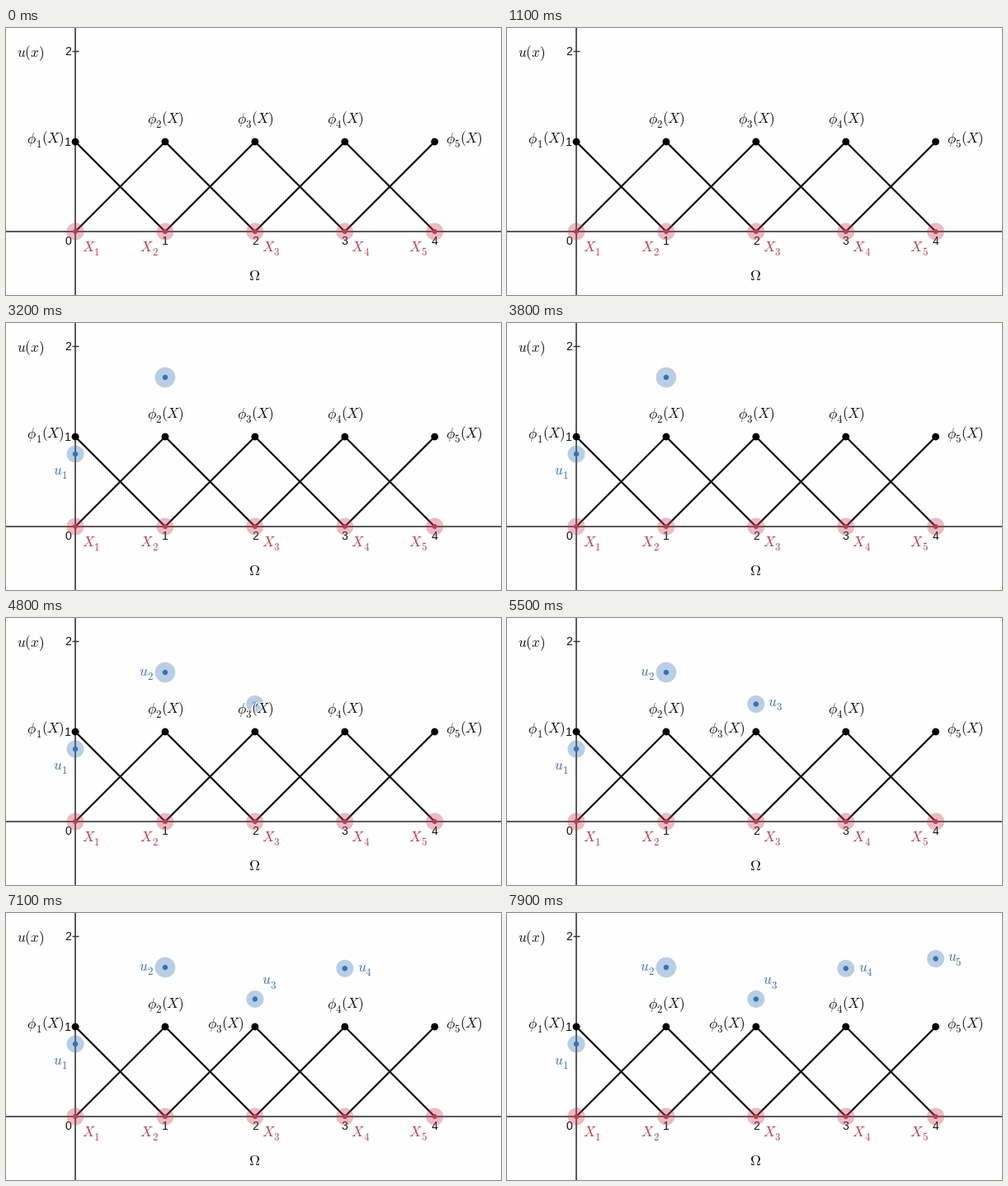
A matplotlib script that plays this animation: 600 by 324 pixels, repeating every 8 s.

```python
import matplotlib.pyplot as plt
from matplotlib.animation import FuncAnimation
from matplotlib.patches import Circle
from matplotlib.patheffects import Stroke

W, H, DPI = 600, 324, 100
STEP, FRAMES = 100, 80
PX = 72 / DPI
EM = 17.2
FOREVER = STEP * FRAMES

BLACK, AXIS = "#111111", "#333333"
RED, BLUE = "#c43a4f", "#3274b5"
X0, UNIT, BASE, PEAK = 84, 108.9, 247, 138

plt.rcParams["mathtext.fontset"] = "cm"
fig = plt.figure(figsize=(W / DPI, H / DPI), dpi=DPI, facecolor="#fefefe")
ax = fig.add_axes([0, 0, 1, 1])
ax.set(xlim=(0, W), ylim=(H, 0))
ax.axis("off")

timed = []  # (artists, start ms, end ms)


def node_x(i):
    return X0 + UNIT * i


def line(xs, ys, color, width, z):
    ax.plot(xs, ys, color=color, lw=width * PX, zorder=z, solid_capstyle="butt")


def glow(x, y, color, radius, core=3):
    halo = Circle((x, y), radius, fc=color, ec="none", alpha=0.34, zorder=4)
    dot = Circle((x, y), core, fc=color, ec="none", zorder=4.1)
    return [ax.add_patch(halo), ax.add_patch(dot)]


def math(x, y, tex, color=BLACK, size=EM):
    """Math text on a baseline, with a white outline beneath."""
    style = dict(fontsize=size * PX, va="baseline", ha="left")
    rim = ax.text(x, y, f"${tex}$", color="white", zorder=5, **style,
                  path_effects=[Stroke(linewidth=3 * PX, foreground="white")])
    ink = ax.text(x, y, f"${tex}$", color=color, zorder=6, **style)
    return [rim, ink]


def label(x, y, base, sub, color=BLACK, tail=""):
    advance = {r"\phi": 0.60, "u": 0.572, "X": 0.83}[base] * EM
    parts = math(x, y, base, color)
    parts += math(x + advance, y + 5.5, str(sub), color, 0.74 * EM)
    if tail:
        parts += math(x + advance + 0.41 * EM, y, tail, color)
    return parts


def phi(x, y, i):
    return label(x, y, r"\phi", i, tail="(X)")


def show(artists, start, end=FOREVER):
    timed.append((artists, start, end))


def number(x, y, n):
    ax.text(x, y, str(n), fontsize=14 * PX, family="Liberation Sans",
            color=BLACK, ha="center", va="baseline", zorder=2)


# axes and ticks
line([0, W], [BASE, BASE], AXIS, 1.6, 1)
line([83.8, 83.8], [0, H], AXIS, 1.6, 1)
number(75, 263, 0)
for n in range(1, 5):
    number(node_x(n), 263, n)
for n in (1, 2):
    y = BASE - 109.3 * n
    number(75, y + 5, n)
    line([80, 88], [y, y], AXIS, 1.4, 1)

# hat functions and nodes
for i in range(5):
    x = node_x(i)
    for j in (i - 1, i + 1):
        if 0 <= j < 5:
            line([x, node_x(j)], [PEAK, BASE], BLACK, 2.2, 3)
    ax.add_patch(Circle((x, PEAK), 4.4, fc="black", ec="none", zorder=3.5))
    glow(x, BASE, RED, 10.5)

for i, x in enumerate((92, 162.5, 310, 418.5, 488.5), 1):
    label(x, 271, "X", i, RED)

math(13, 35, "u(x)")
math(293.8, 306, r"\Omega", size=18)
phi(25.2, 139.5, 1)
phi(171, 115.5, 2)
phi(389, 115.5, 4)
phi(533, 139.5, 5)
show(phi(280, 115.5, 3), 0, 5000)
show(phi(244, 139.5, 3), 5000)

# nodal values
for i, (y, radius, start) in enumerate(
        [(159, 10.5, 1900), (66, 12.3, 3200), (104.5, 10.5, 4500),
         (67.3, 10.5, 5700), (55.5, 10.5, 7200)]):
    show(glow(node_x(i), y, BLUE, radius, 3.2), start)

for i, x, y, start, end in [
        (1, 57.3, 183.5, 2600, FOREVER), (2, 161, 69.5, 3900, FOREVER),
        (3, 316.5, 107, 5200, 6700), (3, 310.5, 86, 6700, FOREVER),
        (4, 425.5, 71, 6200, FOREVER), (5, 533.5, 58, 7700, FOREVER)]:
    show(label(x, y, "u", i, BLUE), start, end)


def update(frame):
    t = frame * STEP
    for artists, start, end in timed:
        for a in artists:
            a.set_visible(start <= t < end)
    return []


anim = FuncAnimation(fig, update, frames=FRAMES, interval=STEP, repeat=True,
                     repeat_delay=0)
plt.show()
```
